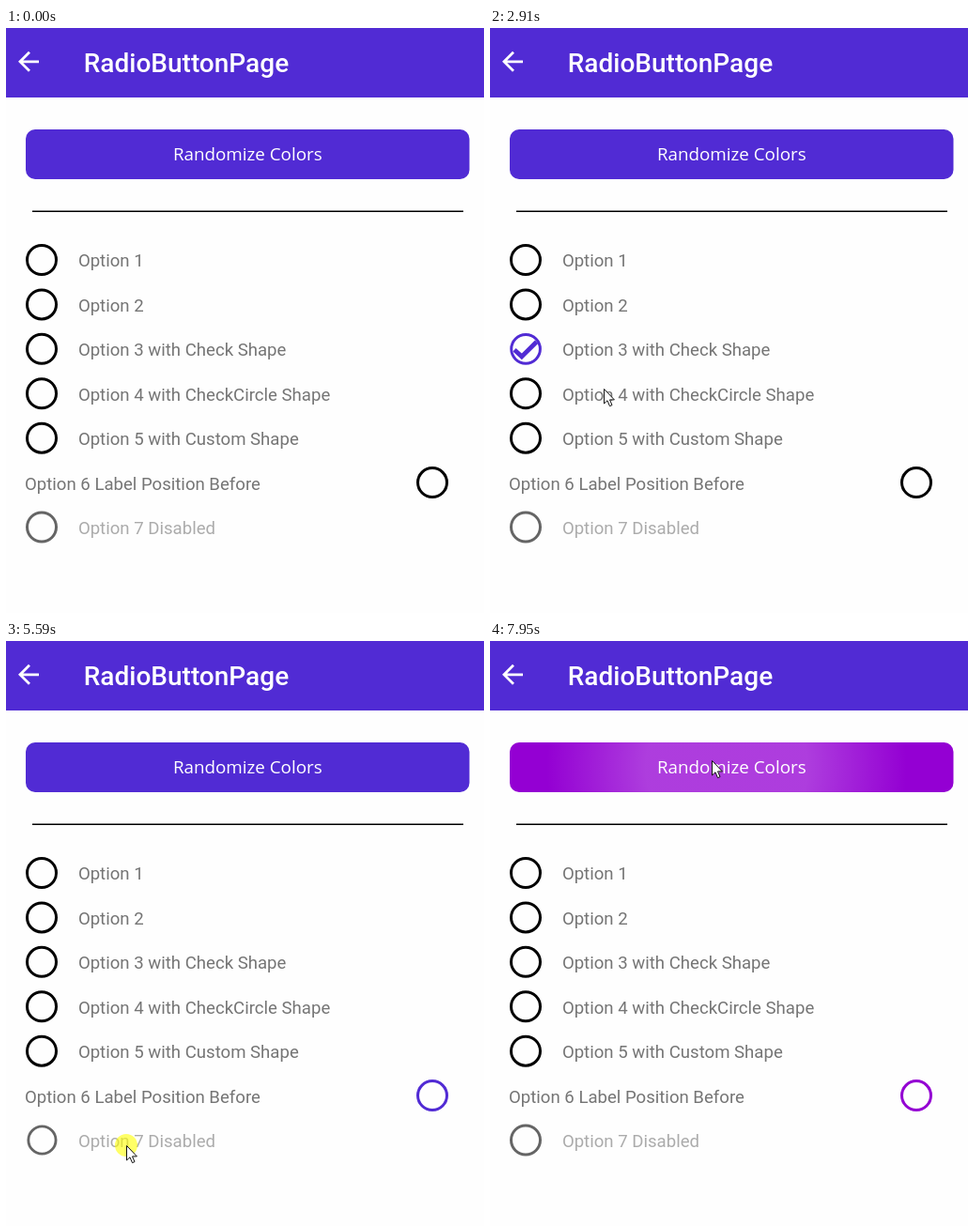
An HTML page that plays this animation: 509 by 623 pixels, repeating every 8 s.

```html
<!DOCTYPE html>
<html lang="en">
<head>
<meta charset="utf-8">
<title>RadioButtonPage</title>
<style>
  html, body { margin: 0; width: 100%; height: 100%; overflow: hidden; background: #fefefe; }
  svg { display: block; width: 509px; height: 623px; }
  .title { font: 500 28px Roboto, sans-serif; fill: #fff; }
  .caption { font: 18.8px "Open Sans", sans-serif; fill: #fff; text-anchor: middle; }
  .label { font: 18.6px Roboto, sans-serif; fill: #757575; }
  .ring { fill: none; stroke-width: 3; }
  .tick { fill: none; stroke-width: 4.8; }
  .off { opacity: .6; }
</style>
</head>
<body>
<svg viewBox="0 0 509 623">
  <defs>
    <clipPath id="clip"><rect x="21" y="108" width="472.5" height="53" rx="10"/></clipPath>
    <radialGradient id="glow">
      <stop offset=".45" stop-color="#fff"/>
      <stop offset="1" stop-color="#fff" stop-opacity="0"/>
    </radialGradient>
  </defs>
  <rect width="509" height="74" fill="#512bd4"/>
  <path transform="translate(7.5 19.3) scale(1.375)" fill="#fff"
    d="M20 11H7.83l5.59-5.59L12 4l-8 8 8 8 1.41-1.41L7.83 13H20v-2z"/>
  <text class="title" x="82.8" y="47">RadioButtonPage</text>

  <rect id="button" x="21" y="108" width="472.5" height="53" rx="10"/>
  <g clip-path="url(#clip)"><circle id="ripple" cx="252" cy="134" fill="url(#glow)"/></g>
  <text class="caption" x="257.3" y="141.3">Randomize Colors</text>
  <path d="M28 195.2H487" stroke="#000" stroke-width="1.6"/>

  <g id="options"></g>

  <circle id="touch" r="12" fill="#ff0" opacity=".6"/>
  <path id="cursor" d="M.5 .5V16L4 12.8 6.5 18.7 9 17.6 6.5 11.9H11.4Z" fill="#fff" stroke="#111"/>
</svg>
<script>
  const LOOP = 8000, HOLD = 130;
  const GOLD_AT = 7120, VIOLET_AT = 7840;
  const DOT = '<circle r="8" fill="currentColor"/>';
  const TICK = '<path class="tick" d="M-12 .8L-4.2 8 11.6-7.6" stroke="currentColor"/>';
  const DISC = '<circle r="12.8" fill="currentColor"/>' +
    '<path d="M-6.5 .2L-2 4.6 7-4.2" fill="none" stroke="#fff" stroke-width="3.2"/>';

  // press: when the pointer goes down on the option
  const options = [
    { text: 'Option 1', press: 1260, mark: DOT },
    { text: 'Option 2', press: 1930, mark: DOT },
    { text: 'Option 3 with Check Shape', press: 2560, mark: TICK },
    { text: 'Option 4 with CheckCircle Shape', press: 3200, mark: DISC },
    { text: 'Option 5 with Custom Shape', press: 3920, mark: DOT },
    { text: 'Option 6 Label Position Before', press: 4750, mark: DOT, before: true },
    { text: 'Option 7 Disabled', press: 5560, mark: '', disabled: true }
  ];

  // time, x, y of the pointer tip
  const path = [
    [200, 396, 565], [860, 121, 245], [1500, 121, 245], [1730, 121, 293],
    [2110, 121, 293], [2290, 121, 343], [2740, 121, 343], [2910, 121, 384],
    [3000, 120, 391], [3200, 118, 391], [3560, 118, 391], [3860, 112, 443],
    [4280, 112, 443], [4550, 120, 477], [5090, 120, 477], [5510, 128, 537],
    [6049, 128, 537], [6050, 181, 556], [6389, 181, 556], [6390, 374, 535],
    [6860, 236, 127]
  ];
  const touches = options.map(o => [o.press, o.press + HOLD])
    .concat([[6920, GOLD_AT], [7640, VIOLET_AT]]);

  const $ = id => document.getElementById(id);
  const clamp = v => Math.max(0, Math.min(1, v));
  const ramp = (t, from, to) => clamp((t - from) / (to - from));
  const show = (el, on) => el.setAttribute('visibility', on ? 'visible' : 'hidden');

  options.forEach((o, i) => {
    const y = 247 + 47.42 * i;
    $('options').insertAdjacentHTML('beforeend',
      `<g ${o.disabled ? 'class="off"' : ''}>
        <text class="label" x="${o.before ? 20 : 76.9}" y="${y + 7.4}">${o.text}</text>
        <g transform="translate(${o.before ? 454 : 38} ${y})">
          <g><circle class="ring" r="15.5"/></g><g>${o.mark}</g>
        </g>
      </g>`);
    const [ring, mark] = $('options').lastElementChild.lastElementChild.children;
    Object.assign(o, { ring, mark });
    o.on = o.disabled ? Infinity : o.press + HOLD;
    o.until = i < 5 ? options[i + 1].press + HOLD : Infinity;
  });

  function pointAt(t) {
    const n = path.findIndex(p => p[0] > t);
    if (n < 1) return (n ? path[path.length - 1] : path[0]).slice(1);
    const a = path[n - 1], b = path[n];
    const k = ramp(t, a[0], b[0]), e = k * k * (3 - 2 * k);
    return [a[1] + (b[1] - a[1]) * e, a[2] + (b[2] - a[2]) * e];
  }

  function drawOption(o, t, accent) {
    const up = o.press + HOLD;
    const dip = ramp(t, o.press, o.press + 100) * (1 - ramp(t, up + 20, up + 230));
    const size = ramp(t, o.on + 20, o.on + 200) * (1 - ramp(t, o.until + 20, o.until + 200));
    const active = t >= o.on && t < o.until;
    o.ring.setAttribute('transform', `translate(${1.5 * dip} 0) scale(${1 - .19 * dip})`);
    o.ring.setAttribute('stroke', active ? accent : '#000');
    o.mark.setAttribute('transform', `scale(${size})`);
    o.mark.setAttribute('color', accent);
    show(o.mark, size > 0);
  }

  function draw(t) {
    const accent = t < GOLD_AT ? '#512bd4' : t < VIOLET_AT ? '#daa520' : '#9400d3';
    $('button').setAttribute('fill', accent);
    options.forEach(o => drawOption(o, t, accent));

    const age = t - (t < VIOLET_AT ? GOLD_AT : VIOLET_AT);
    $('ripple').setAttribute('r', Math.max(0, Math.min(340, 60 + 1.2 * age)));
    $('ripple').setAttribute('opacity', age < 0 ? 0 : .24 * (1 - ramp(age, 280, 520)));

    const [x, y] = pointAt(t);
    const move = `translate(${x} ${y})`;
    $('cursor').setAttribute('transform', move);
    $('touch').setAttribute('transform', move);
    show($('cursor'), t >= 200 && (t < 6120 || t >= 6390));
    show($('touch'), touches.some(([a, b]) => t >= a && t < b));
  }

  let start;
  function tick(now) {
    start ??= now;
    draw((now - start) % LOOP);
    requestAnimationFrame(tick);
  }
  draw(0);
  requestAnimationFrame(tick);
</script>
</body>
</html>
```
